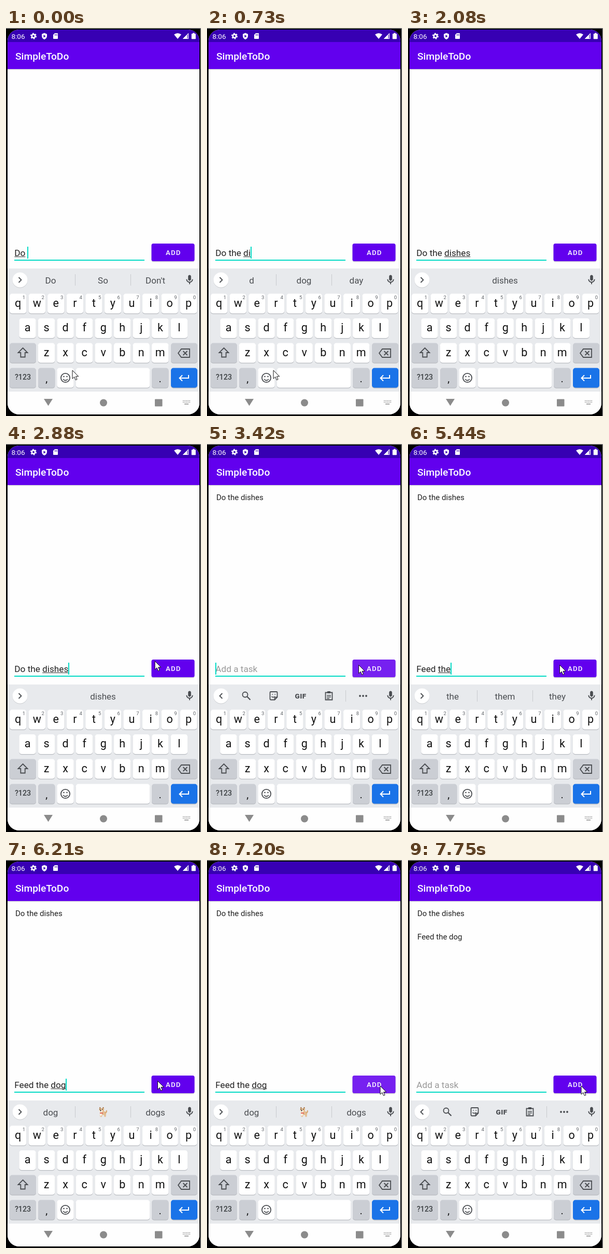
Write an HTML page that moves like this. It is 376 px wide and 747 px high and loops after 8 s.

```html
<!DOCTYPE html>
<html lang="en">
<head>
<meta charset="utf-8">
<title>To-do list</title>
<style>
html, body { margin: 0; width: 100%; height: 100%; overflow: hidden; background: #000; }
svg { display: block; width: 376px; height: 747px; font-family: Roboto, sans-serif; }
text { white-space: pre; }
.mid { text-anchor: middle; }
.line { fill: none; stroke: #4a4d51; stroke-width: 1.8; }
.sug { font-size: 17px; fill: #4a4d51; text-anchor: middle; }
</style>
</head>
<body>
<svg viewBox="0 0 376 747">
  <defs>
    <clipPath id="screen"><rect x="3" y="3" width="370" height="741" rx="22"/></clipPath>
    <clipPath id="buttonClip"><rect x="280.500" y="415" width="83" height="34" rx="3.500"/></clipPath>
  </defs>
  <rect width="376" height="747"/>
  <path d="M0 .5h375.500V747" fill="none" stroke="#b4b4b4"/>
  <g clip-path="url(#screen)">
    <rect x="3" y="3" width="370" height="741" fill="#fefefe"/>
    <rect x="3" y="3" width="370" height="24" fill="#3700b3"/>
    <rect x="3" y="27" width="370" height="52" fill="#6200ee"/>
    <rect x="3" y="79" width="370" height="1.500" fill="#d9d9dc"/>

    <g fill="#fff">
      <text x="10.500" y="20.500" font-size="13.500">8:06</text>
      <circle cx="53" cy="15.500" r="3.200" fill="none" stroke="#fff" stroke-width="2.600"/>
      <circle cx="53" cy="15.500" r="5.100" fill="none" stroke="#fff" stroke-width="2" stroke-dasharray="2.670"/>
      <path d="M74 9.500l5 2.200v3.600c0 3.200-2.100 5.800-5 6.700-2.900-.9-5-3.500-5-6.700v-3.600z"/>
      <path d="M72.500 13l4 2.700-4 2.700z" fill="#3700b3"/>
      <path d="M94 10h5q1 0 1 1v9q0 1-1 1h-7q-1 0-1-1v-7z"/>
      <path d="M94.300 12v2.500M96.300 12v2.500M98.300 12v2.500" stroke="#3700b3"/>
      <path d="M324 12.500q7-5 14 0l-7 8.500z"/>
      <path d="M352 10v11h-11z" opacity=".4"/>
      <path d="M349 13v8h-8z"/><path d="M351.500 10.500v10h-10z" fill="none" stroke="#fff"/>
      <path d="M360 9.500h3.500V11h1.500q.8 0 .8.800v8.700q0 .8-.8.800h-6.500q-.8 0-.8-.8v-8.700q0-.8.800-.8h1.500z"/>
      <text x="18" y="60.500" font-size="19.200" font-weight="500">SimpleToDo</text>
    </g>

    <g font-size="15" fill="#212121">
      <text id="item0" x="18" y="108">Do the dishes</text>
      <text id="item1" x="18" y="153">Feed the dog</text>
    </g>

    <text id="field" x="16.300" y="439.200" font-size="17.200"></text>
    <rect id="compose" y="440" height="1" fill="#333"/>
    <rect x="16" y="446" width="251" height="2" fill="#03dac5"/>
    <rect id="caret" y="421" width="2" height="23" fill="#03dac5"/>

    <rect x="280.500" y="416.500" width="83" height="34" rx="3.500" fill="#bbb" opacity=".6"/>
    <g clip-path="url(#buttonClip)">
      <rect x="280" y="415" width="84" height="34" fill="#6200ee"/>
      <circle id="ripple" fill="#fff"/>
    </g>
    <text x="308" y="437" font-size="13.200" font-weight="500" letter-spacing="1.180" fill="#fff">ADD</text>

    <rect x="3" y="463" width="370" height="237" fill="#e8eaed"/>
    <circle cx="27" cy="486" r="14.500" fill="#c9cbcf"/>
    <circle cx="27" cy="485" r="14.500" fill="#fff"/>
    <path id="chevron" class="line"/>
    <path transform="translate(342.700 473.500) scale(.94)" fill="#4a4d51" d="M12 14c1.660 0 3-1.340 3-3V5c0-1.660-1.340-3-3-3S9 3.340 9 5v6c0 1.660 1.340 3 3 3zm5-3c0 2.760-2.240 5-5 5s-5-2.240-5-5H5c0 3.530 2.610 6.430 6 6.920V21h2v-3.080c3.390-.49 6-3.390 6-6.920h-2z"/>

    <g id="words">
      <text class="sug" x="86" y="491.500"></text>
      <text class="sug" x="187" y="491.500"></text>
      <text class="sug" x="288" y="491.500"></text>
      <path id="bars" d="M133.500 474v22M240.500 474v22" stroke="#c8cace"/>
      <g id="dog">
        <path d="M181 484h10q2.500 1 2 5l-.5 5.500h-3l-.5-3.500h-3.500l-.5 3.500h-3.500z" fill="#e3bd92"/>
        <path d="M191 487q4-1 2.500-5" fill="none" stroke="#d9a873" stroke-width="2.200"/>
        <path d="M179.500 479l1-3 3 2h2l3-2 .5 3q1 7-4.500 7.500-5.500-.5-5-7.500z" fill="#e3bd92"/>
        <path d="M180 478l1-2.500 2 2zM188.500 478l-.5-2.500-2.500 2z" fill="#8f5a35"/>
        <ellipse cx="183" cy="483.500" rx="3" ry="2.300" fill="#fbf0e2"/>
        <path d="M181 488h4l-1 5h-2z" fill="#fbf0e2"/>
        <circle cx="182.500" cy="482.500" r="1.100"/><circle cx="181.300" cy="480" r=".8"/><circle cx="185.800" cy="480" r=".8"/>
        <path d="M181 487.300h6" stroke="#d33" stroke-width="1.300"/>
      </g>
    </g>
    <g id="tools" class="line">
      <circle cx="73.500" cy="482.500" r="5"/><path d="M77 486l6.500 6.500" stroke-width="2.200"/>
      <path d="M123 477h11q1.500 0 1.500 1.500v9l-5 5H123q-1.500 0-1.500-1.500v-12.500q0-1.500 1.500-1.500zM135 487.500h-3q-1.500 0-1.500 1.500v3"/>
      <path d="M125.500 482h1.500M130.500 482h1.500M124.500 486q3 3.500 6 0" stroke-width="1.600"/>
      <text class="mid" x="180.500" y="489.500" font-size="13.500" font-weight="900" fill="#4a4d51" stroke="none" letter-spacing=".4">GIF</text>
      <path d="M228.500 478.500h13v14h-13z"/>
      <path d="M232 478h6" stroke-width="4"/><path d="M231 484h8M231 487h8M231 490h5" stroke-width="1.300"/>
      <path d="M267.500 474v22" stroke="#c8cace" stroke-width="1"/>
      <path d="M295 485h.01M301 485h.01M307 485h.01" stroke-width="3.800" stroke-linecap="round"/>
    </g>

    <g id="keys"></g>

    <g class="line">
      <path d="M32.500 616l9 9h-4.800v8.500h-8.400v-8.500h-4.800z"/>
      <path d="M338 618h16v16h-16l-6-8zM341.500 622l8 8M349.500 622l-8 8"/>
      <circle cx="114.500" cy="673.500" r="8.600"/>
      <path d="M110 676q4.500 5 9 0"/>
      <path d="M352 668v6h-17M340 668.500l-5.500 5.500 5.500 5.500" stroke="#fff" stroke-width="2"/>
    </g>
    <circle cx="111.500" cy="671" r="1.300" fill="#4a4d51"/><circle cx="117.500" cy="671" r="1.300" fill="#4a4d51"/>

    <rect x="3" y="700" width="370" height="44" fill="#fefefe"/>
    <g fill="#8b8b8b">
      <path d="M73 714h17l-8.500 13.500z"/>
      <circle cx="188" cy="721.500" r="7"/>
      <rect x="287" y="714.500" width="14.500" height="14" rx="1"/>
    </g>
    <path d="M341 717.500h14M341 720.500h14" stroke="#8b8b8b" stroke-width="1.600" stroke-dasharray="1.600 1.500"/>
    <path d="M344 724h8" stroke="#8b8b8b" stroke-width="1.600"/>

    <path id="pointer" d="M0 0v16.200l3.800-3.500 2.500 6 2.700-1.200-2.500-5.700h5.200z" fill="#fff" stroke="#111"/>
  </g>
</svg>
<script>
const LOOP = 8000;
const $ = id => document.getElementById(id);
const show = (node, on) => node.setAttribute("visibility", on ? "inherit" : "hidden");
const set = (node, attrs) => { for (const k in attrs) node.setAttribute(k, attrs[k]); };
const clamp = v => Math.max(0, Math.min(1, v));

// Time, typed text, suggestions; "" as suggestions means the toolbar.
const typing = [
  [0, "Do ", "Do|So|Don't"],
  [70, "Do t", "Do|So|Don't"],
  [130, "Do t", "t|the|to"],
  [250, "Do th", "t|the|to"],
  [310, "Do th", "th|the|this"],
  [370, "Do the", "th|the|this"],
  [430, "Do the", "the|them|they"],
  [610, "Do the ", "the|them|they"],
  [670, "Do the d", "d|dog|day"],
  [730, "Do the di", "d|dog|day"],
  [850, "Do the di", "di|did|different"],
  [1030, "Do the dis", "di|did|different"],
  [1090, "Do the dis", "dis|dishes|dish"],
  [1270, "Do the dish", "dish|dishes|"],
  [1450, "Do the dishe", "|dishes|"],
  [1510, "Do the dishes", "|dishes|"],
  [3190, "", ""],
  [4220, "F", ""],
  [4390, "Fe", "F|For|Few"],
  [4580, "Fee", "Fee|Feed|Few"],
  [4840, "Feed", "Fee|Feed|Few"],
  [4900, "Feed", "Feed|Feeds|Feedback"],
  [5020, "Feed ", "Feed|Feeds|Feedback"],
  [5080, "Feed ", "the|me|and"],
  [5260, "Feed t", "t|the|to"],
  [5320, "Feed th", "th|the|this"],
  [5440, "Feed the", "the|them|they"],
  [5720, "Feed the ", "same|dog|family"],
  [5840, "Feed the d", "d|dog|day"],
  [5960, "Feed the do", "do|dog|does"],
  [6210, "Feed the dog", "dog|@|dogs"],
  [7250, "", ""]
];

// Time, x, y of the pointer tip.
const route = [
  [0, 128, 659], [1820, 128, 659], [1960, -14, 640], [2180, -14, 540],
  [2570, 266, 415], [2720, 282, 411], [3050, 292.5, 425.5],
  [6640, 292.5, 425.5], [6780, 334, 435], [LOOP, 334, 435]
];

const presses = [
  { down: 3170, fade: 3425, end: 3690, x: 293, y: 426 },
  { down: 6940, fade: 7230, end: 7510, x: 334, y: 435 }
];

function buildKeys() {
  let out = "";
  const key = (x, y, w, fill, label = "", size = 21.5, drop = 18.3) => {
    const box = (dy, color) =>
      `<rect x="${x}" y="${y + dy}" width="${w}" height="38" rx="4.700" fill="${color}"/>`;
    const color = size < 20 ? "#3c4043" : "#111";
    const weight = size < 20 ? 500 : 400;
    out += box(1.2, "#b9bcc1") + box(0, fill) +
      `<text class="mid" x="${x + w / 2}" y="${y + drop + size * .33}" font-size="${size}" font-weight="${weight}" fill="${color}">${label}</text>`;
  };
  const step = 36.55, grey = "#cbced4";
  [["qwertyuiop", 7, 511.5], ["asdfghjkl", 25.3, 559], ["zxcvbnm", 61.8, 606.5]].forEach(([row, x0, y], r) => {
    [...row].forEach((ch, i) => {
      const x = x0 + i * step;
      key(x, y, 32.4, "#fff", ch);
      if (!r) out += `<text class="mid" x="${x + 27.5}" y="${y + 10.5}" font-size="9.500" fill="#5f6368">${(i + 1) % 10}</text>`;
    });
  });
  key(7, 606.5, 51, grey);
  key(318, 606.5, 51, grey);
  key(7, 654.5, 51, grey, "?123", 14.2);
  key(62, 654.5, 32.4, grey, ",", 20, 20.5);
  key(98.3, 654.5, 32.4, "#fff");
  key(134.8, 654.5, 142.5, "#fff");
  key(281, 654.5, 32.4, grey, ".", 20, 20.5);
  key(318, 654.5, 51, "#1a73e8");
  $("keys").innerHTML = out;
}

const pen = document.createElement("canvas").getContext("2d");
function measure(str) {
  pen.font = "17.2px Roboto, sans-serif";
  return pen.measureText(str).width;
}

function drawField(t) {
  const now = typing.findLastIndex(s => s[0] <= t);
  const [, text, words] = typing[now];
  let first = now;
  while (first && typing[first - 1][1] === text) first--;
  const age = t - typing[first][0];

  $("field").textContent = text || "Add a task";
  $("field").setAttribute("fill", text ? "#212121" : "#999");
  show($("caret"), age % 1040 < 500);
  $("caret").setAttribute("x", Math.round(16 + measure(text)));

  const word = text.trim(), start = word.lastIndexOf(" ") + 1;
  show($("compose"), word && (text === word || text === "Do "));
  set($("compose"), {
    x: 16.3 + measure(word.slice(0, start)),
    width: measure(word.slice(start))
  });

  const list = words.split("|");
  show($("words"), words);
  show($("tools"), !words);
  document.querySelectorAll(".sug").forEach((node, i) => {
    node.textContent = list[i] === "@" ? "" : list[i] || "";
  });
  show($("bars"), list[0]);
  show($("dog"), list[1] === "@");
  $("chevron").setAttribute("d", words ? "M24.500 480l5 5-5 5" : "M29.500 480l-5 5 5 5");
}

function drawPointer(t) {
  const i = Math.max(1, route.findIndex(p => p[0] > t));
  const [t0, x0, y0] = route[i - 1], [t1, x1, y1] = route[i];
  const k = clamp((t - t0) / (t1 - t0));
  $("pointer").setAttribute("transform", `translate(${x0 + (x1 - x0) * k} ${y0 + (y1 - y0) * k})`);
}

function drawRipple(t) {
  const p = presses.find(q => t >= q.down && t < q.end);
  show($("ripple"), p);
  if (!p) return;
  const grow = 1 - (1 - clamp((t - p.down) / 225)) ** 2;
  set($("ripple"), {
    cx: p.x + (322 - p.x) * grow,
    cy: p.y + (432 - p.y) * grow,
    r: 12 + 36 * grow,
    opacity: .125 * (1 - clamp((t - p.fade) / (p.end - p.fade)))
  });
}

function draw(t) {
  drawField(t);
  $("item0").setAttribute("opacity", clamp((t - 3190) / 120));
  $("item1").setAttribute("opacity", clamp((t - 7250) / 120));
  drawRipple(t);
  drawPointer(t);
}

buildKeys();
const begin = performance.now();
function tick() {
  draw((performance.now() - begin) % LOOP);
  requestAnimationFrame(tick);
}
tick();
</script>
</body>
</html>
```
